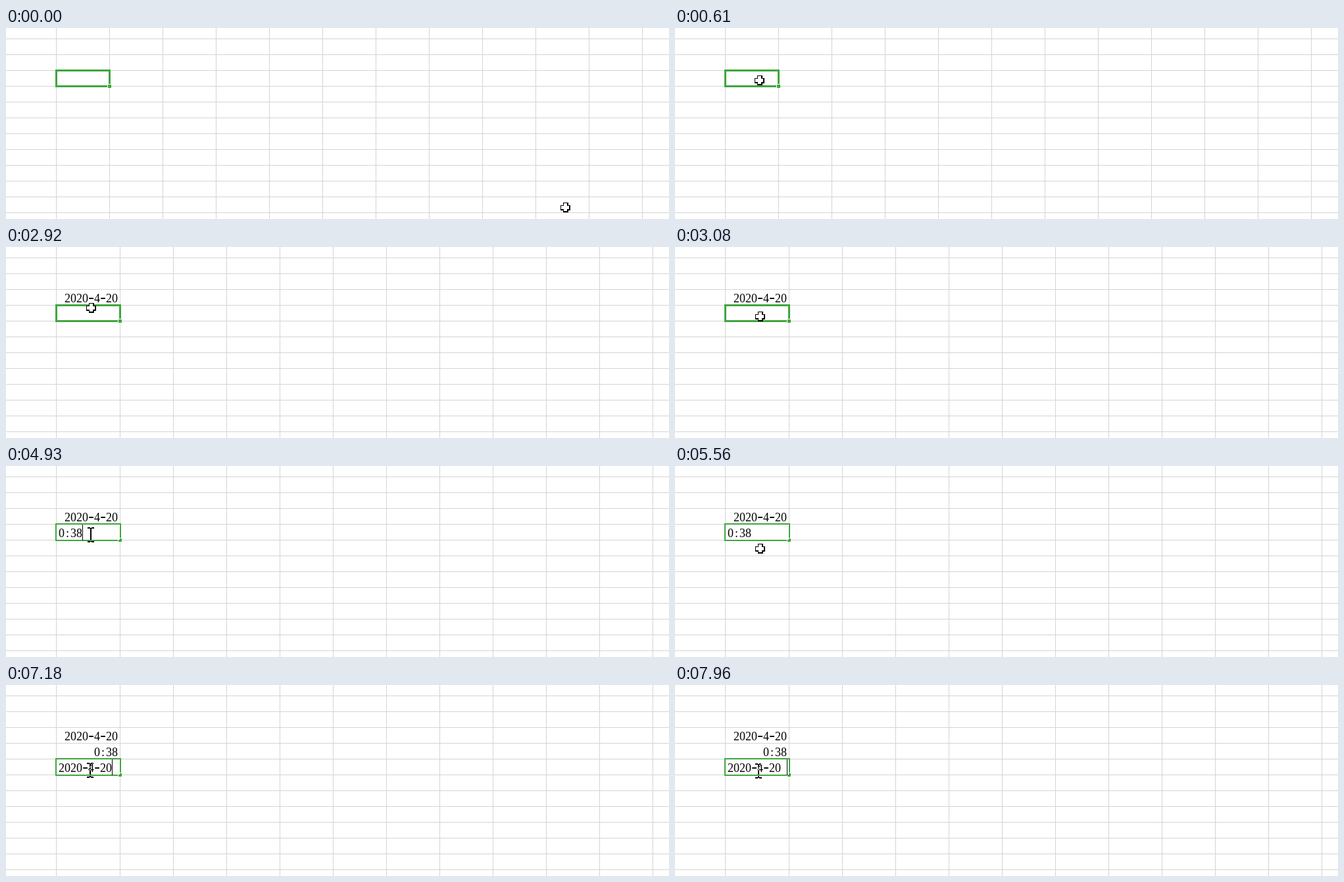
Write an HTML page that moves like this. It is 1008 by 290 pixels and loops after 8000 ms.

```html
<!DOCTYPE html>
<html lang="en">
<head>
<meta charset="utf-8">
<title>Spreadsheet entry</title>
<style>
html, body { margin: 0; width: 100%; height: 100%; overflow: hidden; background: #fff; }
svg { display: block; }
text { font: 18px "Liberation Serif", "Times New Roman", serif; text-anchor: middle; }
.dash { font-size: 26px; }
.beam { mix-blend-mode: difference; }
</style>
</head>
<body>
<svg id="stage" width="1008" height="290" viewBox="0 0 1008 290" shape-rendering="crispEdges"></svg>
<script>
const LOOP = 8000, W = 1008, H = 290;
const LEFT = 76, TOP = 64, ROW = 24, COL = 81, PITCH = 9;
const GREEN = '#40a640', GRID = '#d4d4d4';
const stage = document.getElementById('stage');

// Each entry is typed in its own row, then committed.
const entries = [
  { text: '2020-4-20', start: 2150, commit: 2840 },
  { text: '0:38', start: 4930, commit: 5710 },
  { text: '2020-4-20', start: 7180, commit: Infinity }
];
const SPACE_AT = 7960;
const caretTimes = [[2150, 2610], [4930, 5410], [7180, 7660], [SPACE_AT, LOOP]];

// The pointer moves in small jumps, from first to last inclusive.
const origin = { x: 850, y: 272 };
const moves = [
  { first: 70, last: 610, steps: 8, x: 128, y: 79 },
  { first: 2690, last: 3080, steps: 6, x: 129, y: 105 },
  { first: 5330, last: 5560, steps: 4, x: 129, y: 125 },
  { first: 6020, last: 6100, steps: 2, x: 128, y: 130 },
  { first: 7890, last: 7960, steps: 2, x: 127, y: 131 }
];

const rect = (x, y, w, h, fill) =>
  `<rect x="${x}" y="${y}" width="${w}" height="${h}" fill="${fill}"/>`;

function pointerAt(t) {
  let p = origin;
  for (const m of moves) {
    if (t < m.first) break;
    const gap = (m.last - m.first) / (m.steps - 1);
    const done = Math.min(m.steps, Math.floor((t - m.first) / gap + 1.001));
    const u = done / m.steps, e = u * u * (3 - 2 * u);
    p = { x: Math.round(p.x + (m.x - p.x) * e), y: Math.round(p.y + (m.y - p.y) * e) };
  }
  return p;
}

function grid(right) {
  let s = rect(0, 0, W, H, '#fff');
  for (let y = 16; y < H; y += ROW) s += rect(0, y, W, 1, GRID);
  s += rect(LEFT, 0, 1, H, GRID);
  for (let x = right; x < W; x += COL) s += rect(x, 0, 1, H, GRID);
  return s;
}

function label(text, x, row) {
  const xs = [...text].map((c, i) => x + (i + 0.5) * PITCH).join(' ');
  const body = text.replace(/-/g, '<tspan class="dash">-</tspan>');
  return `<text x="${xs}" y="${TOP + 20 + row * ROW}">${body}</text>`;
}

function selection(right, row) {
  const y = TOP + row * ROW, bottom = y + ROW, w = right - LEFT;
  return `<rect x="${LEFT + 0.5}" y="${y + 0.5}" width="${w}" height="${ROW}" fill="none" stroke="${GREEN}" stroke-width="3"/>`
    + rect(right - 3, bottom - 3, 6, 6, '#fff')
    + rect(right - 2, bottom - 2, 5, 5, GREEN);
}

function editor(t, right, row) {
  const { text } = entries[row];
  const length = text.length + (t >= SPACE_AT ? 1 : 0);
  const x = LEFT + 4, y = TOP + 1 + row * ROW, caret = x + length * PITCH;
  const end = Math.max(right, caret + 1);
  const blink = caretTimes.some(([on, off]) => t >= on && t < off);
  return rect(LEFT + 1, y, end - LEFT - 1, 23, '#fff')
    + label(text, x, row)
    + (blink ? rect(caret, y, 1, ROW, '#000') : '');
}

function cross({ x, y }) {
  return rect(x - 3, y - 7, 8, 15, '#000') + rect(x - 7, y - 3, 15, 8, '#000')
    + rect(x - 2, y - 6, 5, 12, '#fff') + rect(x - 6, y - 2, 12, 5, '#fff');
}

// Inverts what lies below it, so it turns black on white cells.
function beam({ x, y }) {
  const end = (outer, inner) => rect(x - 5, outer, 4, 1, '#fff')
    + rect(x + 1, outer, 4, 1, '#fff') + rect(x - 5, inner, 10, 1, '#fff');
  return `<g class="beam">${end(y - 12, y - 11)}${rect(x - 1, y - 10, 2, 19, '#fff')}${end(y + 10, y + 9)}</g>`;
}

function scene(t) {
  const row = entries.filter(e => t >= e.commit).length;
  const right = row ? 173 : 157;
  const editing = t >= entries[row].start;
  const p = pointerAt(t);
  const inside = p.y < TOP + (row + 1) * ROW + 1;
  let s = grid(right);
  for (let i = 0; i < row; i++) {
    const { text } = entries[i];
    s += label(text, right - 3 - text.length * PITCH, i);
  }
  s += selection(right, row);
  if (editing) s += editor(t, right, row);
  return s + (editing && inside ? beam(p) : cross(p));
}

let shown = '';
function draw(now) {
  const next = scene(now % LOOP);
  if (next !== shown) stage.innerHTML = shown = next;
}

const begin = performance.now();
function tick() {
  draw(performance.now() - begin);
  requestAnimationFrame(tick);
}
tick();
</script>
</body>
</html>
```
